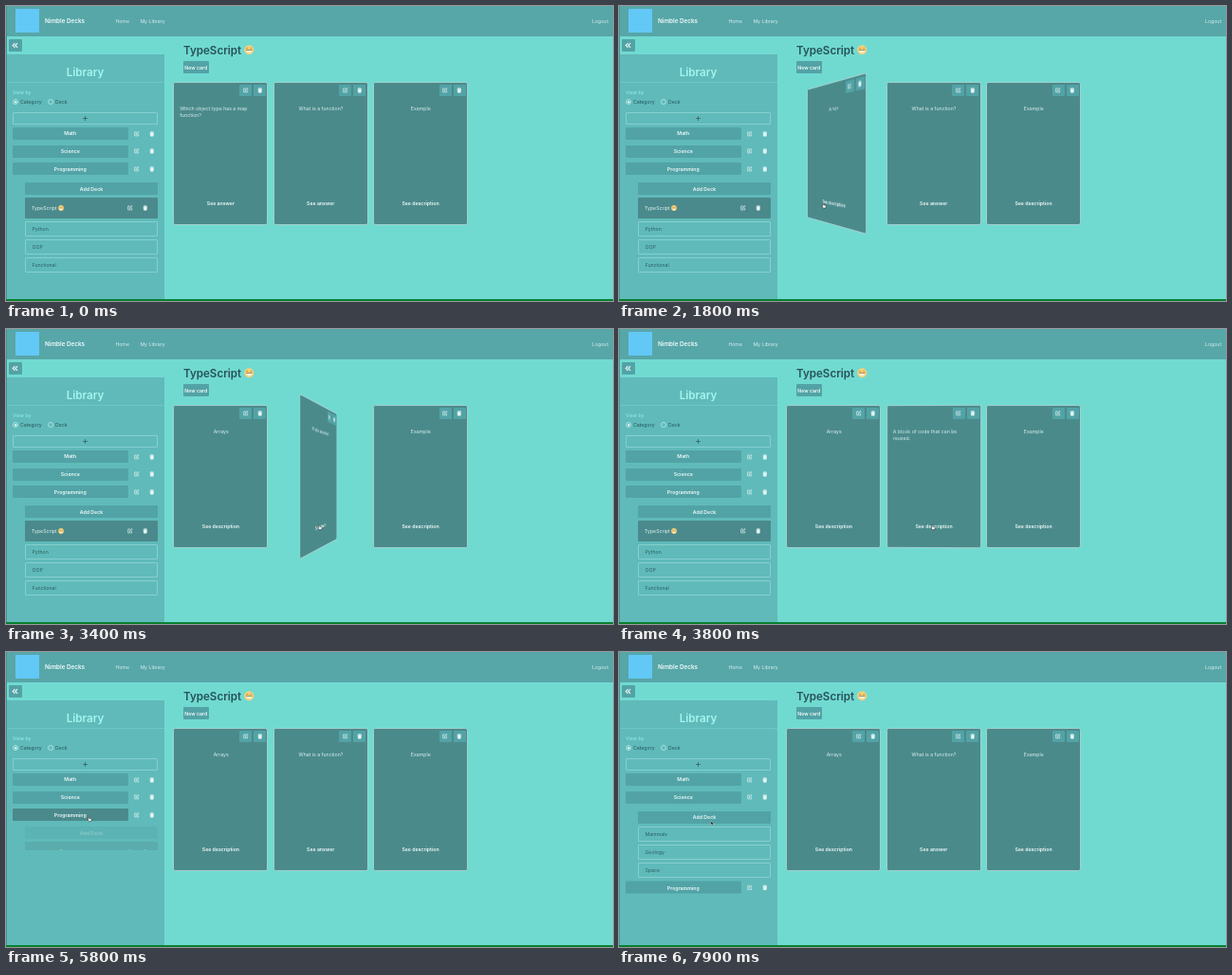
An HTML page that plays this animation: 640x311 px, repeating every 8000 ms.

```html
<!DOCTYPE html>
<html lang="en">
<head>
<meta charset="utf-8">
<title>Flash card library</title>
<style>
  html, body { margin: 0; width: 100%; height: 100%; overflow: hidden; background: #70dad1; }
  body { position: relative; font: 5.2px Inter, sans-serif; color: #d8efee; }
  div { position: absolute; box-sizing: border-box; display: flex; align-items: center; white-space: pre; }
  svg { display: block; flex: none; overflow: visible; }
  .bar { background: #57a6a8; }
  .side { background: #60baba; }
  .btn { background: #52a3a6; border-radius: 1px; justify-content: center; font-weight: 600; color: #f0fafa; }
  .hover, .active { background: #4b8a8c; }
  .active { border-radius: 1px; color: #e4f4f3; padding-left: 7px; }
  .deck { border: 1px solid #85d0ce; border-radius: 1px; color: #2c5f63; padding-left: 6.5px; }
  .mid { justify-content: center; }
  .bold { font-weight: 600; color: #f0fafa; }
  .dark { color: #25555a; }
  .title { font-size: 11.6px; font-weight: 600; color: #285258; }
  .card { background: #4b8a8b; border: 1px solid #a3cfce; border-radius: 2.5px; }
  .text { white-space: normal; line-height: 7.5px; }
  .clip { overflow: hidden; }
  .radio { border: 1px solid #a9e2e0; border-radius: 50%; }
</style>
</head>
<body>
<script>
const add = (parent, cls, x, y, w, h, html = '') => {
  const el = document.createElement('div');
  el.className = cls;
  el.style.cssText = `left:${x}px;top:${y}px;width:${w}px;height:${h}px`;
  el.innerHTML = html;
  return parent.appendChild(el);
};
const page = document.body;
const svg = (size, body) =>
  `<svg width="${size}" height="${size}" viewBox="0 0 12 12" fill="none" stroke="#e6f5f4" stroke-width="1.4">${body}</svg>`;
const EDIT = svg(5.6, '<path d="M6 2H1.5V10.5H10V6.5M4.5 7.5L5 5.5L9.5 1L11 2.5L6.5 7Z"/>');
const TRASH = svg(5.6, '<path d="M2.5 3.5H9.5L9 11H3Z" fill="#e6f5f4"/><path d="M1.5 2.3H10.5M4.5 1H7.5"/>');
const grin = size => svg(size, `<g stroke="none"><circle cx="6" cy="6" r="5.8" fill="#f8d077"/>
  <path d="M2.2 6.3H9.8C9.6 11 2.4 11 2.2 6.3Z" fill="#fff3dc"/></g>
  <path d="M2.5 4.7Q3.7 2.8 4.8 4.7M7.2 4.7Q8.3 2.8 9.5 4.7M2.2 6.3H9.8" stroke="#8a6a3a" stroke-width=".8"/>`);

// Header and page heading
add(page, 'bar', 0, 0, 640, 32);
add(page, '', 9.5, 3, 25, 25).style.background = '#62c8f6';
add(page, 'bold', 41, 10, 60, 12, 'Nimble Decks').style.fontSize = '6.3px';
add(page, '', 115.4, 10, 30, 12, 'Home');
add(page, '', 141.4, 10, 40, 12, 'My Library');
add(page, '', 618, 10, 22, 12, 'Logout');
add(page, 'title', 187, 39, 70, 16, 'TypeScript');
add(page, '', 251, 41, 10.5, 10.5, grin(10.5));
add(page, 'btn', 187, 58, 26.5, 13, 'New card');

// Sidebar
add(page, 'btn', 3, 35, 13.5, 13, svg(7, '<path d="M6 2L2 6L6 10M10.5 2L6.5 6L10.5 10" stroke-width="1.9"/>'));
const side = add(page, 'side clip', 0, 51, 167, 259);
const panel = add(side, '', 0, -51, 167, 311);
add(panel, 'title mid', 0, 62, 167, 16, 'Library').style.color = '#a5f5ee';
add(panel, '', 1, 80, 166, 1).style.background = '#70c6c5';
add(panel, '', 7, 86, 40, 10, 'View by').style.color = '#93efe9';
add(panel, 'radio mid', 7, 98, 6, 6, svg(2.4, '<circle cx="6" cy="6" r="6" fill="#e6f5f4" stroke="none"/>'));
add(panel, 'dark', 15, 96, 30, 10, 'Category');
add(panel, 'radio', 43.5, 98, 6, 6);
add(panel, 'dark', 52, 96, 20, 10, 'Deck');
add(panel, 'deck', 7, 112, 153, 13);
add(panel, 'mid', 7, 112, 153, 13, svg(5, '<path d="M6 0V12M0 6H12" stroke="#25494f"/>'));

const makeRow = (name, y) => {
  const row = add(panel, '', 0, y - 6.5, 167, 13);
  const button = add(row, 'btn', 7, 0, 121.5, 13, name);
  add(row, 'mid', 132, 0, 12, 13, EDIT);
  add(row, 'mid', 147.5, 0, 12, 13, TRASH);
  return { row, button, y };
};
const rows = [makeRow('Math', 134.3), makeRow('Science', 153), makeRow('Programming', 171.7)];

const makeDecks = (rowY, height, first, names) => {
  const clip = add(panel, 'clip', 0, rowY + 9, 167, height);
  const list = add(clip, '', 0, 0, 167, height);
  add(list, 'btn', 20, 5.5, 140, 13, 'Add Deck');
  names.forEach((name, i) => add(list, 'deck', 20, first + i * 19.2, 140, 16, name));
  return { clip, list, height };
};
const science = makeDecks(153, 76.5, 21.8, ['Mammals', 'Geology', 'Space']);
const coding = makeDecks(171.7, 103, 46.3, ['Python', 'OOP', 'Functional']);
const active = add(coding.list, 'active', 20, 21.5, 140, 22, 'TypeScript ' + grin(6));
add(active, 'mid', 104.5, 0, 12, 22, EDIT);
add(active, 'mid', 121, 0, 12, 22, TRASH);

// Cards
const makeCard = (x, ...faces) => {
  const el = add(page, 'card', x, 80.4, 100, 151);
  add(el, 'btn bar', 68.7, 1.6, 13, 12.5, EDIT);
  add(el, 'btn bar', 83.7, 1.6, 13, 12.5, TRASH);
  const text = add(el, 'mid text', 5.8, 23.6, 87, 'auto');
  return { el, text, link: add(el, 'mid bold', 0, 121.3, 98, 11), faces };
};
const cards = [
  makeCard(176.4, ['Which object type has a map function?', 'See answer'], ['Arrays', 'See description']),
  makeCard(281.7, ['What is a function?', 'See answer'], ['A block of code that can be reused.', 'See description']),
  makeCard(387, ['Example', 'See description'])
];

// Window edges
add(page, '', 0, 0, 1, 311).style.background = '#489496';
add(page, '', 0, 309, 640, 2).style.background = '#08802f';

const cursor = add(page, '', 0, 0, 6, 6);
const HAND = svg(5.6, '<path d="M3 1Q4 0 5 1V5L9 6Q10.5 6.5 10 8L9 12H4.5L1 8Q1 6.5 3 7.5Z" fill="#fff" stroke="#222" stroke-width="1"/>');
const ARROW = svg(5.6, '<path d="M1 0V9L3.3 7L5 10.5L6.5 9.8L5 6.5H8Z" fill="#111" stroke="#fff" stroke-width=".8"/>');

// Motion
const ease = p => {
  if (p <= 0 || p >= 1) return p <= 0 ? 0 : 1;
  const bezier = (s, a, b) => 3 * a * s * (1 - s) ** 2 + 3 * b * s * s * (1 - s) + s ** 3;
  let lo = 0, hi = 1;
  for (let i = 0; i < 24; i++) {
    const mid = (lo + hi) / 2;
    if (bezier(mid, .25, .25) < p) lo = mid; else hi = mid;
  }
  return bezier(lo, .1, 1);
};
const step = (t, start, length) => ease((t - start) / length);

// Pointer stops: arrive, leave, x, y
const stops = [
  [0, 300, 90, 215], [1100, 2100, 213.5, 207.5], [2700, 4950, 328.5, 206],
  [5500, 6050, 85.5, 173], [6400, 7000, 80, 153], [7950, 8000, 96.5, 178.5]
];

const pointerAt = t => {
  const i = stops.findLastIndex(s => s[0] <= t);
  const [, leave, x, y] = stops[i];
  if (t <= leave || i === stops.length - 1) return { x, y, parked: i < stops.length - 1 };
  const [arrive, , nx, ny] = stops[i + 1];
  const p = (t - leave) / (arrive - leave), k = p * p * (3 - 2 * p);
  return { x: x + (nx - x) * k, y: y + (ny - y) * k, parked: false };
};

const FLIP = 600;
const setFlip = (card, amount) => {
  const angle = amount * 180, back = angle > 90;
  const [text, link] = card.faces[back ? 1 : 0];
  card.text.textContent = text;
  card.link.textContent = link;
  card.el.style.transform = angle % 180 ? `perspective(337px) rotateY(${back ? angle - 180 : angle}deg)` : 'none';
};

const setOpen = ({ clip, list, height }, open) => {
  clip.style.height = height * open + 'px';
  clip.style.opacity = open;
  list.style.transform = `translateY(${(open - 1) * 2.8}px)`;
};

const draw = t => {
  setFlip(cards[0], step(t, 1548, FLIP));
  setFlip(cards[1], step(t, 3260, FLIP) - step(t, 4270, FLIP));
  setFlip(cards[2], 0);

  const open = step(t, 6600, 300), shift = open * science.height;
  setOpen(coding, 1 - step(t, 5715, 200));
  setOpen(science, open);
  rows[2].row.style.transform = `translateY(${shift}px)`;

  const { x, y, parked } = pointerAt(t);
  rows.forEach((r, i) => {
    const rowY = r.y + (i === 2 ? shift : 0);
    r.button.classList.toggle('hover', x > 7 && x < 129 && Math.abs(y - rowY) < 6.5);
  });
  cursor.style.visibility = t < 300 ? 'hidden' : 'visible';
  cursor.style.transform = `translate(${x}px, ${y}px)`;
  const shape = parked ? HAND : ARROW;
  if (cursor.shape !== shape) cursor.innerHTML = cursor.shape = shape;
};

const start = performance.now();
const tick = () => {
  draw((performance.now() - start) % 8000);
  requestAnimationFrame(tick);
};
tick();
</script>
</body>
</html>
```
